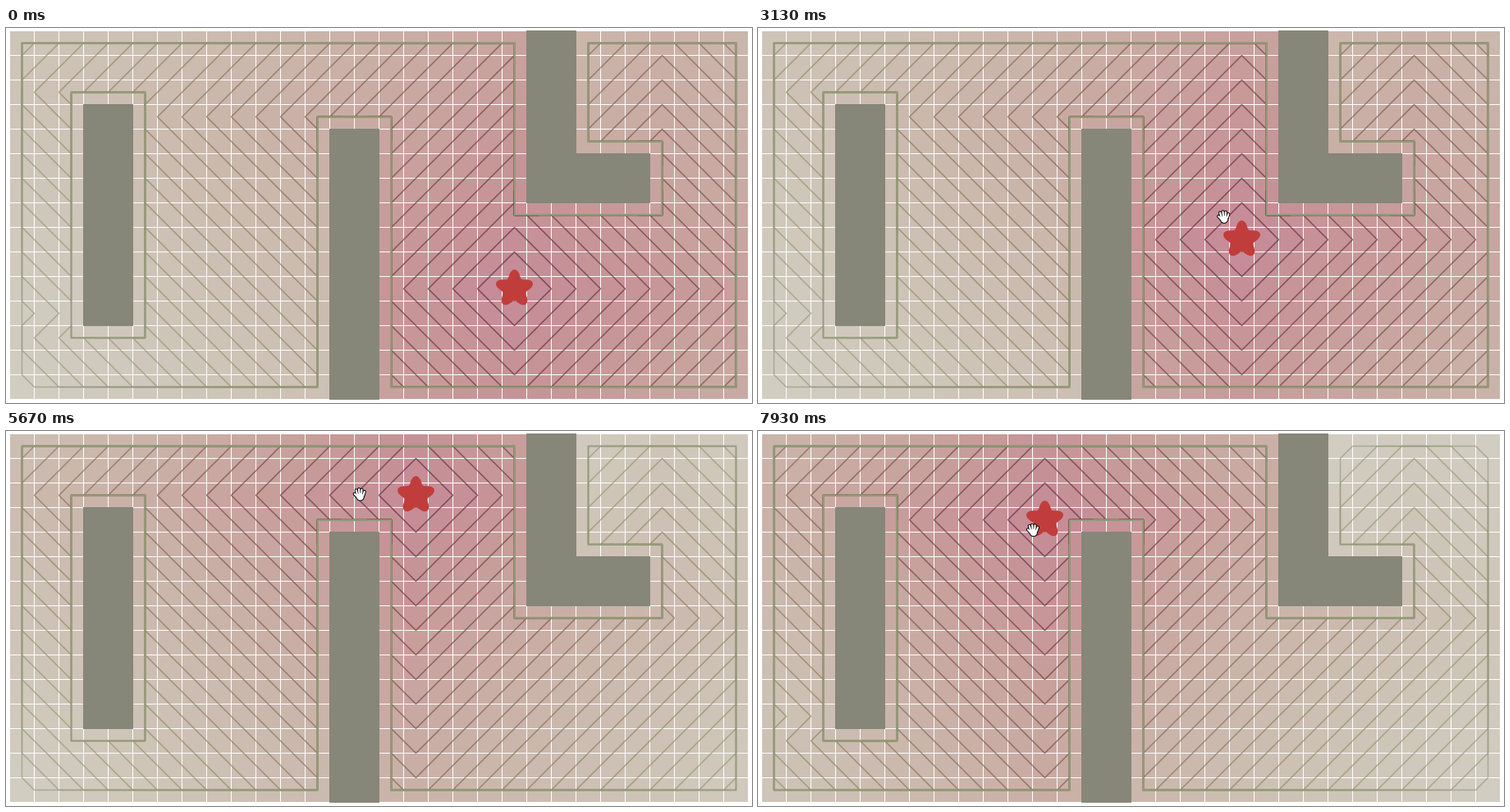
A matplotlib script that plays this animation: 909 by 458 pixels, repeating every 8000 ms.

```python
import colorsys

import matplotlib.pyplot as plt
import numpy as np
from matplotlib.animation import FuncAnimation
from matplotlib.patches import Circle, Polygon, Rectangle
from matplotlib.transforms import Affine2D
from matplotlib.tri import Triangulation

W, H, DPI = 909, 458, 100
FRAMES, STEP = 160, 50
PX = 72 / DPI
COLS, ROWS, CELL = 30, 15, 30
LEFT, TOP = 4.5, 3.5
RIGHT, BOTTOM = LEFT + COLS * CELL, TOP + ROWS * CELL
CLIFF = 5000

# column, row, width, height in cells
WALLS = [(3, 3, 2, 9), (13, 4, 2, 11), (21, 0, 2, 7), (21, 5, 5, 2)]
WALL_COLOR = colorsys.hls_to_rgb(1 / 6, 0.5, 0.05)

# pointer path: time, x, y
PATH = np.array([
    (270, 851, 363), (800, 625, 320), (1070, 625, 320), (2270, 599, 282),
    (4000, 533, 175), (4870, 516, 96), (5750, 420, 75), (6400, 393, 72),
    (7900, 335, 121),
])
SHOW_AT, HOVER_AT, DRAG_AT = 270, 680, 1070
LAG = 630  # the dragged goal trails the pointer

wall = np.zeros((ROWS, COLS), bool)
for c, r, w, h in WALLS:
    wall[r:r + h, c:c + w] = True


def center(col, row):
    return LEFT + CELL * (col + 0.5), TOP + CELL * (row + 0.5)


def pointer_at(t):
    return [np.interp(t, PATH[:, 0], PATH[:, k]) for k in (1, 2)]


def goal_at(t):
    x, y = pointer_at(max(t - LAG, DRAG_AT))
    return int((x - LEFT) // CELL), int((y - TOP) // CELL)


def distances(col, row):
    """Breadth-first step counts from one cell; walls stay at CLIFF."""
    dist = np.full((ROWS, COLS), CLIFF, float)
    dist[row, col] = 0
    queue = [(col, row)]
    for x, y in queue:
        for nx, ny in ((x + 1, y), (x - 1, y), (x, y + 1), (x, y - 1)):
            inside = 0 <= nx < COLS and 0 <= ny < ROWS
            if inside and not wall[ny, nx] and dist[ny, nx] == CLIFF:
                dist[ny, nx] = dist[y, x] + 1
                queue.append((nx, ny))
    return dist


def blend(t, start, end):
    """Mix two (hue degrees, saturation, lightness) colours, fast at first."""
    t = min(t, 1) ** 0.75
    hue, sat, light = (a + (b - a) * t for a, b in zip(start, end))
    return colorsys.hls_to_rgb(hue / 360 % 1, light, sat)


def cell_color(t):
    return blend(t, (-16, 0.35, 0.655), (45, 0.15, 0.79))


def line_color(t):
    return blend(t, (-36, 0.38, 0.23), (75, 0.12, 0.56))


def mean_of_corners(grid):
    return (grid[:-1, :-1] + grid[:-1, 1:] + grid[1:, :-1] + grid[1:, 1:]) / 4


def with_middles(grid):
    return np.concatenate([grid.ravel(), mean_of_corners(grid).ravel()])


def build_mesh():
    """Cell centres with a one-cell margin; each square is four triangles."""
    xs, ys = np.meshgrid(*center(np.arange(-1, COLS + 1), 0)[:1],
                         center(0, np.arange(-1, ROWS + 1))[1])
    ids = np.arange(xs.size).reshape(xs.shape)
    ring = [ids[:-1, :-1], ids[:-1, 1:], ids[1:, 1:], ids[1:, :-1]]
    ring = [part.ravel() for part in ring]
    middle = xs.size + np.arange(ring[0].size)
    triangles = np.vstack([
        np.column_stack([ring[k], ring[(k + 1) % 4], middle])
        for k in range(4)])
    return Triangulation(with_middles(xs), with_middles(ys), triangles)


fig = plt.figure(figsize=(W / DPI, H / DPI), dpi=DPI, facecolor="white")
ax = fig.add_axes([0, 0, 1, 1])
ax.axis("off")

floor = ax.imshow(np.ones((ROWS, COLS, 3)), extent=(LEFT, RIGHT, BOTTOM, TOP),
                  interpolation="nearest", aspect="auto", zorder=0)
ax.set(xlim=(0, W), ylim=(H, 0))
ax.set_autoscale_on(False)
ax.vlines(LEFT + CELL * np.arange(COLS + 1), TOP, BOTTOM,
          colors="white", lw=PX, snap=False, zorder=1)
ax.hlines(TOP + CELL * np.arange(ROWS + 1), LEFT, RIGHT,
          colors="white", lw=PX, snap=False, zorder=1)
for c, r, w, h in WALLS:
    ax.add_patch(Rectangle((LEFT + c * CELL, TOP + r * CELL), w * CELL,
                           h * CELL, fc=WALL_COLOR, ec=WALL_COLOR, lw=PX,
                           snap=False, zorder=3))

star_shift, pointer_shift = Affine2D(), Affine2D()
on_star = star_shift + ax.transData
on_pointer = pointer_shift + ax.transData

angle = np.linspace(0, 2 * np.pi, 120)
radius = 19 + 4.4 * np.cos(5 * angle)
ax.add_patch(Polygon(
    np.column_stack([radius * np.sin(angle), -radius * np.cos(angle)]),
    fc="#c03d3b", ec="none", zorder=4, transform=on_star))


def hand_layer(color, grow, z):
    """Open hand: a round palm, four fanned fingers and a thumb."""
    k = np.arange(4)
    base, tip = -2.6 + 2.4 * k, -4.2 + 3.35 * k
    tip_y = -6.3 + 0.9 * (k - 1.2) ** 2
    strokes = [((b, x), (1, y)) for b, x, y in zip(base, tip, tip_y)]
    strokes.append(((-2.5, -6.2), (3.2, -0.6)))
    parts = [ax.plot(*s, color=color, lw=(2.2 + 2 * grow) * PX, zorder=z,
                     solid_capstyle="round", transform=on_pointer)[0]
             for s in strokes]
    palm = Circle((0.7, 3), 4.2 + grow, fc=color, ec="none", zorder=z,
                  transform=on_pointer)
    return parts + [ax.add_patch(palm)]


hand = hand_layer("black", 1, 5) + hand_layer("white", 0, 6)
arrow = ax.add_patch(Polygon(
    [(0, 0), (0, 15), (3.5, 12), (6, 17.5), (8.3, 16.5), (6, 11), (10.5, 11)],
    fc="black", ec="white", lw=PX, zorder=5, transform=on_pointer))

mesh = build_mesh()
state = {"goal": None, "lines": None}


def place_goal(goal):
    if goal == state["goal"]:
        return
    if state["lines"]:
        state["lines"].remove()
    dist = distances(*goal)
    far = dist[~wall].max()
    floor.set_data([[cell_color(d / far) for d in row] for row in dist])
    levels = np.arange(0.5, far)
    heights = with_middles(np.pad(dist, 1, constant_values=CLIFF))
    state["lines"] = ax.tricontour(
        mesh, heights, levels, colors=[line_color(v / far) for v in levels],
        linewidths=1.5 * PX, alpha=0.7, zorder=2)
    state["goal"] = goal
    star_shift.clear().translate(*center(*goal))


def update(i):
    t = i * STEP
    place_goal(goal_at(t))
    pointer_shift.clear().translate(*pointer_at(t))
    arrow.set_visible(SHOW_AT <= t < HOVER_AT)
    for part in hand:
        part.set_visible(t >= HOVER_AT)
    return []


anim = FuncAnimation(fig, update, frames=FRAMES, interval=STEP,
                     init_func=lambda: update(0), repeat=True, repeat_delay=0)
plt.show()
```
